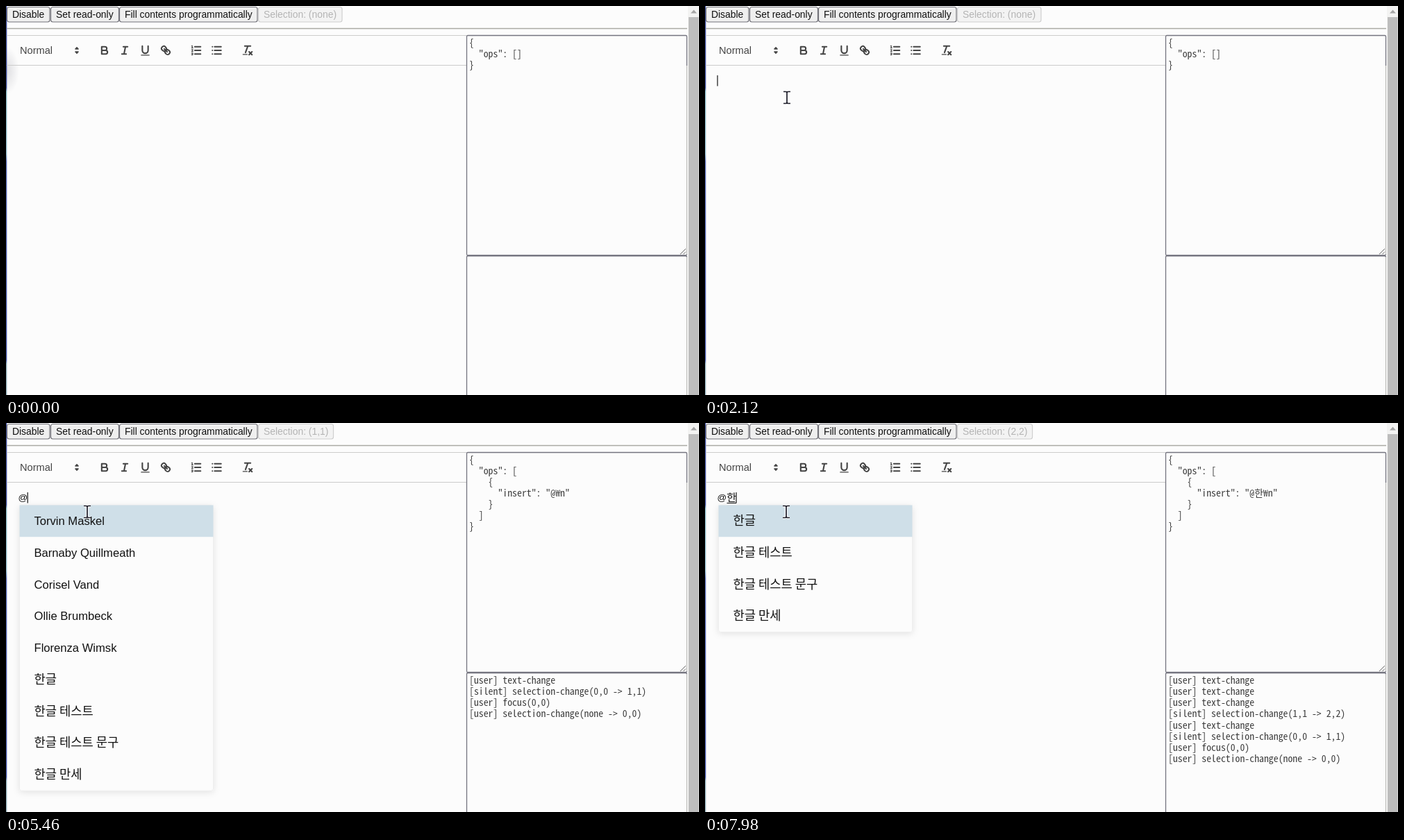
Animation of 998x561 px, one loop 8000 ms. Source, as an HTML page:

```html
<!DOCTYPE html>
<html lang="en">
<head>
<meta charset="utf-8">
<title>Rich text editor with mentions</title>
<style>
  html, body { margin: 0; width: 100%; height: 100%; overflow: hidden; background: #fcfcfc; }
  svg { display: block; width: 998px; height: 561px; }
  text { font-family: "Liberation Sans", Arial, "Noto Sans CJK KR", sans-serif; white-space: pre; }
  .mono { font: 13.8px "Noto Sans Mono CJK KR", "Noto Sans Mono", monospace; fill: #3c3c3c; }
  .button { font-size: 13.9px; }
  .korean { font-family: "Noto Sans CJK KR", "Noto Sans CJK", sans-serif; }
  .icon { fill: none; stroke: #444; stroke-width: 2; stroke-linecap: round; stroke-linejoin: round; }
  .icon .thin { stroke-width: 1; }
  .icon .fill { fill: #444; stroke: none; }
</style>
</head>
<body>
<svg id="stage" viewBox="0 0 998 561">
  <defs>
    <linearGradient id="edge" x2="0" y2="1">
      <stop offset="0" stop-color="#3a4a98"/><stop offset=".21" stop-color="#3a4a98"/>
      <stop offset=".22" stop-color="#7fb0bc"/><stop offset=".38" stop-color="#8ab4c4"/>
      <stop offset=".4" stop-color="#5568b4"/><stop offset=".91" stop-color="#4052a8"/>
      <stop offset=".92" stop-color="#8aa8b4"/><stop offset="1" stop-color="#8aa8b4"/>
    </linearGradient>
    <radialGradient id="haze"><stop stop-color="#667" stop-opacity=".2"/><stop offset="1" stop-color="#667" stop-opacity="0"/></radialGradient>
    <filter id="shadow" x="-20%" y="-20%" width="140%" height="140%">
      <feDropShadow dx="0" dy="2" stdDeviation="5" flood-color="#1e1e1e" flood-opacity=".1"/>
    </filter>
  </defs>
  <rect width="998" height="561" fill="#fcfcfc"/>
  <ellipse id="leftHaze" cx="1" cy="93" rx="18" ry="34" fill="url(#haze)"/>
  <rect width="1.3" height="561" fill="url(#edge)"/>
  <path d="M1 32.5H981" stroke="#aaaaa4" stroke-width="1.5"/>
  <path d="M1 42.5H663M1 85.5H663" stroke="#cccccb"/>

  <g id="buttons"></g>

  <text x="20" y="68.8" font-size="14.6" fill="#444">Normal</text>
  <g id="toolbar" class="icon"></g>

  <g fill="none" stroke="#74747f" stroke-width="1.3">
    <path d="M980.5 86V359" stroke="#b4b4b0" stroke-width="1"/>
    <path d="M980.5 86V44q0-1.5-1.5-1.5H665q-1.5 0-1.5 1.5V358q0 1.5 1.5 1.5H979q1.5 0 1.5-1.5"/>
    <path d="M663.5 561V362q0-1.5 1.5-1.5H979q1.5 0 1.5 1.5"/>
    <path d="M980.5 362V561" stroke="#b4b4b0" stroke-width="1"/>
    <path d="M971 358l8-8M975.5 358l3.500-3.500" stroke="#666" stroke-width="1"/>
  </g>
  <g id="json" class="mono"></g>
  <g id="log" class="mono"></g>

  <rect x="982" width="16" height="561" fill="#f3f3f2"/>
  <path d="M986 10.500l4.500-5 4.500 5z" fill="#a6a6a6"/>
  <rect x="983" y="16" width="14.500" height="545" fill="#bdbdbd"/>

  <g id="editor"></g>
  <path id="caret" d="M0 100V115.500" stroke="#111" stroke-width="1.200"/>
  <g id="menu"></g>

  <g id="arrow">
    <path d="M0 0V17L4 13.500L6.600 19.700L9.400 18.500L6.800 12.500H12Z" fill="#fff" stroke="#222"/>
  </g>
  <g id="beam" fill="none">
    <path id="beamShape" d="M-5-8.500H-2Q0-8.500 0-7Q0-8.500 2-8.500H5M0-7V7M-5 8.500H-2Q0 8.500 0 7Q0 8.500 2 8.500H5" stroke="#fff" stroke-width="3.500"/>
    <use href="#beamShape" style="stroke:#111"/>
    <path d="M-5-8.500H-2Q0-8.500 0-7Q0-8.500 2-8.500H5M0-7V7M-5 8.500H-2Q0 8.500 0 7Q0 8.500 2 8.500H5" stroke="#1c1c28" stroke-width="1.700"/>
  </g>
</svg>
<script>
const LOOP = 8000, BLINK = 530, ROW = 45.75;
const $ = id => document.getElementById(id);

const people = ["Torvin Maskel", "Barnaby Quillmeath", "Corisel Vand", "Ollie Brumbeck", "Florenza Wimsk"];
const phrases = ["한글", "한글 테스트", "한글 테스트 문구", "한글 만세"];

const icons = [
  [102, '<path class="fill" d="M7 11L9 13L11 11ZM7 7L9 5L11 7Z" style="stroke:#444;stroke-width:1.4"/>'],
  [142, '<path d="M5 4H9.5A2.5 2.5 0 0 1 9.5 9H5ZM5 9H10.5A2.5 2.5 0 0 1 10.5 14H5Z"/>'],
  [171, '<path d="M7 4H13M5 14H11M8 14L10 4"/>'],
  [200.5, '<path d="M5 3V9A4 4 0 0 0 13 9V3"/><rect class="fill" x="3" y="15" width="12" height="1.2" rx=".5"/>'],
  [230, '<path d="M7 7L11 11M8.9 4.6a3.5 3.5 0 0 1 .36 4.7A3.5 3.5 0 0 1 4.6 8.900C3.200 7.500 2 6.400 4.200 4.200S7.500 3.200 8.900 4.600ZM13.400 9.100a3.500 3.500 0 0 0-4.700-.36a3.500 3.500 0 0 0 .36 4.700c1.400 1.400 2.500 2.500 4.700.36S14.800 10.500 13.400 9.100Z"/>'],
  [274, '<path d="M7 4H15M7 9H15M7 14H15"/><path class="thin" d="M2.500 3L3.500 2.500V5.500M2.500 5.500H4.500M4.500 10.500H2.500Q4.400 9 4.400 8.200A1 1 0 0 0 2.500 8.100M2.500 14.800a1 1 0 0 0 1.900-.1A.7.7 0 0 0 3.700 14A.7.7 0 0 0 4.400 13.200A1 1 0 0 0 2.500 13.100"/>'],
  [303.5, '<path d="M6 4H15M6 9H15M6 14H15M3 4H3M3 9H3M3 14H3"/>'],
  [348, '<path d="M5 3H13M6 12L9.300 3M11 11L15 15M15 11L11 15"/><rect class="fill" x="2" y="14" width="7" height="1.200" rx=".5"/>']
];
$("toolbar").innerHTML = icons.map(([x, shape]) =>
  `<g transform="translate(${x} 64) scale(1.04) translate(-9 -9)">${shape}</g>`).join("");

// Each step adds its log lines above the older ones.
const steps = [
  { at: 0, typed: "", selection: "none", log: [] },
  { at: 2180, typed: "", selection: "0,0", log: ["[user] focus(0,0)", "[user] selection-change(none -> 0,0)"] },
  { at: 5240, typed: "@", selection: "1,1", log: ["[user] text-change", "[silent] selection-change(0,0 -> 1,1)"], menu: [...people, ...phrases] },
  { at: 6240, typed: "@ㅎ", selection: "2,2", log: ["[user] text-change", "[silent] selection-change(1,1 -> 2,2)"] },
  { at: 7000, typed: "@하", selection: "2,2", log: ["[user] text-change"] },
  { at: 7640, typed: "@한", selection: "2,2", log: ["[user] text-change"], menu: phrases }
];

const pointer = [[400, 238, -22], [580, 219, 33], [900, 170, 74], [1250, 125, 122], [1650, 118, 132], [2300, 118, 132], [2600, 117, 128]];

function pointerAt(t) {
  const next = pointer.findIndex(p => p[0] > t);
  if (next === 0) return [-50, -50];
  if (next < 0) return pointer.at(-1).slice(1);
  const [t0, x0, y0] = pointer[next - 1], [t1, x1, y1] = pointer[next];
  const k = (t - t0) / (t1 - t0);
  return [x0 + (x1 - x0) * k, y0 + (y1 - y0) * k];
}

const escape = s => s.replace(/&/g, "&amp;").replace(/</g, "&lt;").replace(/>/g, "&gt;");
const textLines = (lines, y, step) => lines.map((line, i) =>
  `<text class="mono" x="667" y="${y + i * step}">${escape(line)}</text>`).join("");

function button(x, width, label, fill, border, color) {
  return `<rect x="${x}" y="1.500" width="${width}" height="21.500" rx="3" fill="${fill}" stroke="${border}" stroke-width="1.200"/>
    <text class="button" x="${x + 7.5}" y="16.800" fill="${color}">${label}</text>`;
}

function buttons(selection, hover) {
  const active = ["#efefef", "#73737a", "#111"];
  return button(1.5, 61.5, "Disable", ...active)
    + button(64.5, 98, "Set read-only", ...active)
    + button(163.5, 198.5, "Fill contents programmatically", ...(hover ? ["#e3e1e7", "#4c4c54", "#111"] : active))
    + button(363.5, selection === "none" ? 120.5 : 108, `Selection: (${selection})`, "#f3f3f3", "#cfcfcf", "#b4b4b4");
}

function jsonLines(typed) {
  if (!typed) return ["{", '  "ops": []', "}"];
  return ["{", '  "ops": [', "    {", `      "insert": "${typed}₩n"`, "    }", "  ]", "}"];
}

function editorText(typed) {
  if (!typed) return "";
  const syllable = typed.slice(1);
  return `<text x="17.500" y="112" font-size="13.500" fill="#111">@</text>` + (syllable &&
    `<text class="korean" x="31.300" y="112.500" font-size="15" fill="#111">${syllable}</text>
     <path d="M31.500 115.500H45" stroke="#111"/>`);
}

function menu(items) {
  if (!items) return "";
  const rows = items.map((item, i) => {
    const korean = phrases.includes(item);
    return `<text class="${korean ? "korean" : ""}" x="40.500" y="${147 + i * ROW}" font-size="${korean ? 17.7 : 16.6}" fill="#111">${item}</text>`;
  });
  return `<rect x="19.500" y="118.500" width="279" height="${items.length * ROW}" rx="3" fill="#fcfcfc" stroke="#eeeeee" filter="url(#shadow)"/>
    <rect x="19.500" y="118.500" width="279" height="${ROW}" fill="#cfdfe8"/>${rows.join("")}`;
}

function setHTML(id, html) {
  const node = $(id);
  if (node.source !== html) node.innerHTML = node.source = html;
}

function render(t) {
  const done = steps.filter(s => s.at <= t), now = done.at(-1);
  const log = done.reduce((lines, s) => [...s.log, ...lines], []);
  setHTML("buttons", buttons(now.selection, t >= 460 && t < 640));
  setHTML("json", textLines(jsonLines(now.typed), 57.5, 16.05));
  setHTML("log", textLines(log, 376, 16.14));
  setHTML("editor", editorText(now.typed));
  setHTML("menu", menu(now.menu));

  const focused = 1860, blinkStart = now.typed ? now.at : focused;
  const caretOn = t >= focused && Math.floor((t - blinkStart) / BLINK) % 2 === 0;
  $("caret").setAttribute("visibility", caretOn ? "visible" : "hidden");
  $("caret").setAttribute("transform", `translate(${[18, 31.2, 45][now.typed.length]} 0)`);

  const [x, y] = pointerAt(t), overText = y > 86;
  for (const id of ["arrow", "beam"]) {
    $(id).setAttribute("transform", `translate(${x} ${y})`);
    $(id).setAttribute("visibility", (id === "beam") === overText ? "visible" : "hidden");
  }
  $("leftHaze").setAttribute("opacity", t < 1560 ? 1 : 0);
}

const start = performance.now();
function tick() {
  render((performance.now() - start) % LOOP);
  requestAnimationFrame(tick);
}
tick();
</script>
</body>
</html>
```
